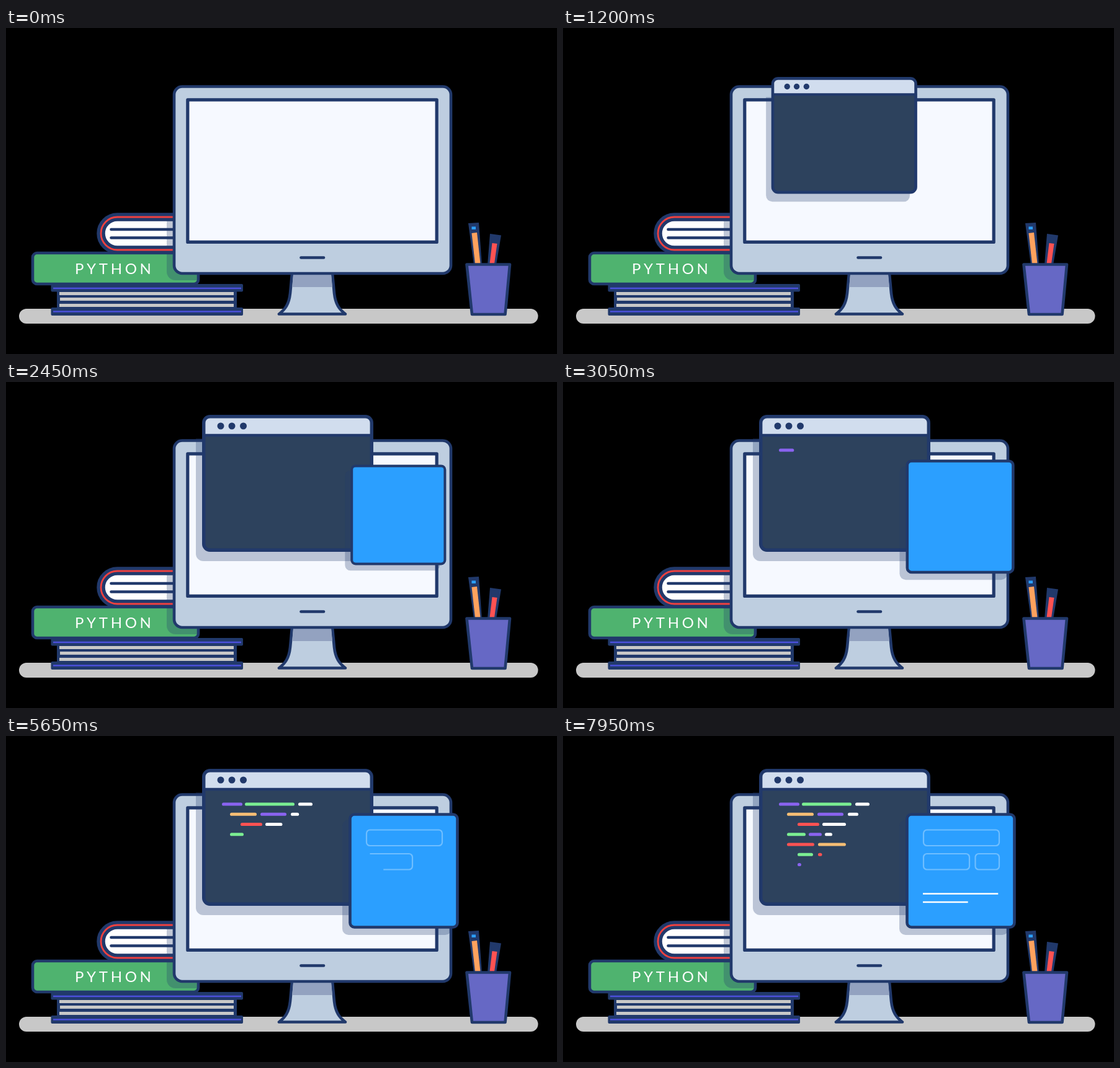
Write an HTML page that moves like this. It is 888 px wide and 526 px high and loops after 8 s.

```html
<!DOCTYPE html>
<html lang="en">
<head>
<meta charset="utf-8">
<title>Desk with code windows</title>
<style>
  html, body { margin: 0; width: 100%; height: 100%; overflow: hidden; background: #000; }
  svg { display: block; width: 100%; height: 100%; }
  .line { stroke: #21396b; stroke-width: 4.6; stroke-linejoin: round; stroke-linecap: round; }
  .shade { fill: #21396b; opacity: .28; }
  .bare { fill: none; }
  text { font: 24px Lato, "Open Sans", sans-serif; letter-spacing: 4.7px; font-kerning: none; fill: #fff; }
</style>
</head>
<body>
<svg id="stage" viewBox="0 0 888 526">
  <clipPath id="onBooks"><path d="M160 311H275V352H160ZM44 364H302a7 7 0 0 1 7 7V412H44Z"/></clipPath>

  <rect x="21" y="453" width="836.5" height="24" rx="12" fill="#c8c8c8"/>

  <!-- books -->
  <g fill="#21396b">
    <rect x="82" y="422" width="290" height="34"/>
    <rect x="72.5" y="413" width="309.5" height="12.5" rx="2"/>
    <rect x="72.5" y="451" width="309.5" height="13" rx="2"/>
  </g>
  <path d="M86 428.5H367M87 437.5H367M86 447.5H367" stroke="#c8c8c8" stroke-width="5"/>
  <path d="M76 420H379M76 457.5H379" stroke="#4b50dc" stroke-width="2.5"/>
  <path d="M280 305H179.5a26.5 26.5 0 0 0 0 53H280" fill="#fff" stroke="#21396b" stroke-width="13.5"/>
  <path d="M280 305H179.500a26.5 26.5 0 0 0 0 53H280" class="bare" stroke="#f0413f" stroke-width="2.8"/>
  <path d="M169.5 325H280M169.5 338.5H280" class="line"/>
  <rect x="43" y="363" width="267" height="50" rx="7" class="line" fill="#4fb36f"/>
  <text x="111" y="397">PYTHON</text>
  <rect x="259" y="300" width="300" height="107" rx="14" class="shade" clip-path="url(#onBooks)"/>

  <!-- monitor -->
  <path d="M461 396L458 428C456 446 450 454 440 461.5H547C537 454 531 446 529 428L526 396Z" class="line" fill="#becee0"/>
  <path d="M463 396H524L526 418H461.2Z" fill="#93a2c0"/>
  <rect x="271" y="94.5" width="446" height="301.5" rx="13" class="line" fill="#becee0"/>
  <rect x="292.8" y="115.8" width="401.4" height="229.6" class="line" style="stroke-width:5.2" fill="#f6f9ff"/>
  <path d="M475.5 370.5H512" class="line"/>

  <!-- pen cup -->
  <path d="M745 315L762 314L767 382H754Z" fill="#21396b"/>
  <path d="M750.5 331L759 330L764.5 380H756Z" fill="#ffa25e"/>
  <rect x="750.5" y="320.5" width="6.5" height="4.5" fill="#2b9fff"/>
  <path d="M780 332L798 334.5L790 382H776Z" fill="#21396b"/>
  <path d="M783.5 347L791.5 348L787 380H779.5Z" fill="#ff5252"/>
  <path d="M742.5 381.5H812L804.5 462H751Z" class="line" fill="#6668c5"/>

  <!-- code window -->
  <g id="codeWin">
    <path class="shade" d="M306 91H578V278a11 11 0 0 1-11 11H318a12 12 0 0 1-12-12Z"/>
    <rect x="318.7" y="55.7" width="270.6" height="215.6" rx="10" fill="#2d425d"/>
    <path d="M318.7 85.5V65.7a10 10 0 0 1 10-10H579.3a10 10 0 0 1 10 10V85.5Z" fill="#d1ddee"/>
    <path d="M319 86H589" class="line"/>
    <rect x="318.7" y="55.7" width="270.6" height="215.6" rx="10" class="line bare" style="stroke-width:5.4"/>
    <g fill="#21396b"><circle cx="346" cy="71" r="5.5"/><circle cx="364" cy="71" r="5.5"/><circle cx="382.5" cy="71" r="5.5"/></g>
  </g>
  <g id="code" stroke-width="5.2" stroke-linecap="round"></g>

  <!-- blue panel -->
  <g id="panel">
    <rect class="shade" x="542" y="135" width="176" height="186" rx="10"/>
    <rect x="554.5" y="126.5" width="173" height="182" rx="7" class="line" fill="#2b9fff"/>
  </g>
  <g id="form" fill="none" stroke="#fff" stroke-width="2.2"></g>
</svg>
<script>
const LOOP = 8000, GROW = 2000, DRAW = 1067, SLOT = 870, FIRST = 2580;
const $ = id => document.getElementById(id);
const clamp = v => Math.min(1, Math.max(0, v));
const easeOut = p => 1 - (1 - p) ** 2;

// cubic-bezier(.2, 0, .1, 1), solved by bisection
function pop(p) {
  let lo = 0, hi = 1;
  for (let i = 0; i < 24; i++) {
    const u = (lo + hi) / 2, v = 1 - u;
    if (.6 * u * v * v + .3 * u * u * v + u ** 3 < p) lo = u; else hi = u;
  }
  return lo * lo * (3 - 2 * lo);
}

const strokes = [];
function addStroke(parent, tag, attrs, start) {
  const el = document.createElementNS("http://www.w3.org/2000/svg", tag);
  for (const k in attrs) el.setAttribute(k, attrs[k]);
  el.setAttribute("pathLength", 1);
  $(parent).append(el);
  strokes.push({ el, start });
}

const INK = { p: "#8a63f0", g: "#7bee92", w: "#ffffff", o: "#f6be74", r: "#ff5252" };
// [colour, left, right] of each dash; every row starts one slot after the row above
const rows = [
  [["p", 348, 381], ["g", 385, 465], ["w", 471, 494]],
  [["o", 361, 404], ["p", 410, 452], ["w", 459, 476]],
  [["r", 378, 413], ["w", 418, 456]],
  [["g", 361, 391], ["p", 396, 417], ["w", 422, 434]],
  [["r", 361, 405], ["o", 411, 456]],
  [["g", 378, 403], ["r", 411, 421]],
  [["p", 378, 386]]
];
rows.forEach((row, i) => row.forEach(([ink, left, right], j) =>
  addStroke("code", "path", {
    d: `M${left + 2.6} ${110 + i * 16.25}H${right - 2.6}`, stroke: INK[ink]
  }, FIRST + SLOT * (i + j))));

const box = (x, y, width, start) => addStroke("form", "rect",
  { x, y, width, height: 25.5, rx: 5.5, "stroke-opacity": .32 }, start);
const rule = (y, right, start) => addStroke("form", "path",
  { d: `M580 ${y}H${right}`, "stroke-width": 2.6 }, start);
box(581, 151.5, 122, 3930);
box(581, 190, 74, 5150);
box(664.5, 190, 38.5, 6090);
rule(254.5, 701.5, 6930);
rule(268, 653.5, 7000);

// grow a window from its starting centre to its resting centre (x, y)
function grow(id, p, x, y, dx, dy) {
  const s = pop(p), el = $(id);
  el.setAttribute("transform",
    `translate(${x + dx * (1 - s)} ${y + dy * (1 - s)}) scale(${s}) translate(${-x} ${-y})`);
  el.setAttribute("visibility", p > 0 ? "visible" : "hidden");
  el.querySelector(".shade").style.opacity = .28 * clamp((s - .27) * 4);
}

function draw(t) {
  grow("codeWin", clamp((t - 195) / GROW), 454, 163.5, -5, 66);
  grow("panel", clamp((t - 1400) / GROW), 641, 217.5, -66, -23.5);
  for (const { el, start } of strokes) {
    const p = easeOut(clamp((t - start) / DRAW));
    el.setAttribute("visibility", p > 0 ? "visible" : "hidden");
    el.setAttribute("stroke-dasharray", p < 1 ? `${p} 2` : "none");
  }
}

function tick() {
  draw(performance.now() % LOOP);
  requestAnimationFrame(tick);
}
tick();
</script>
</body>
</html>
```
